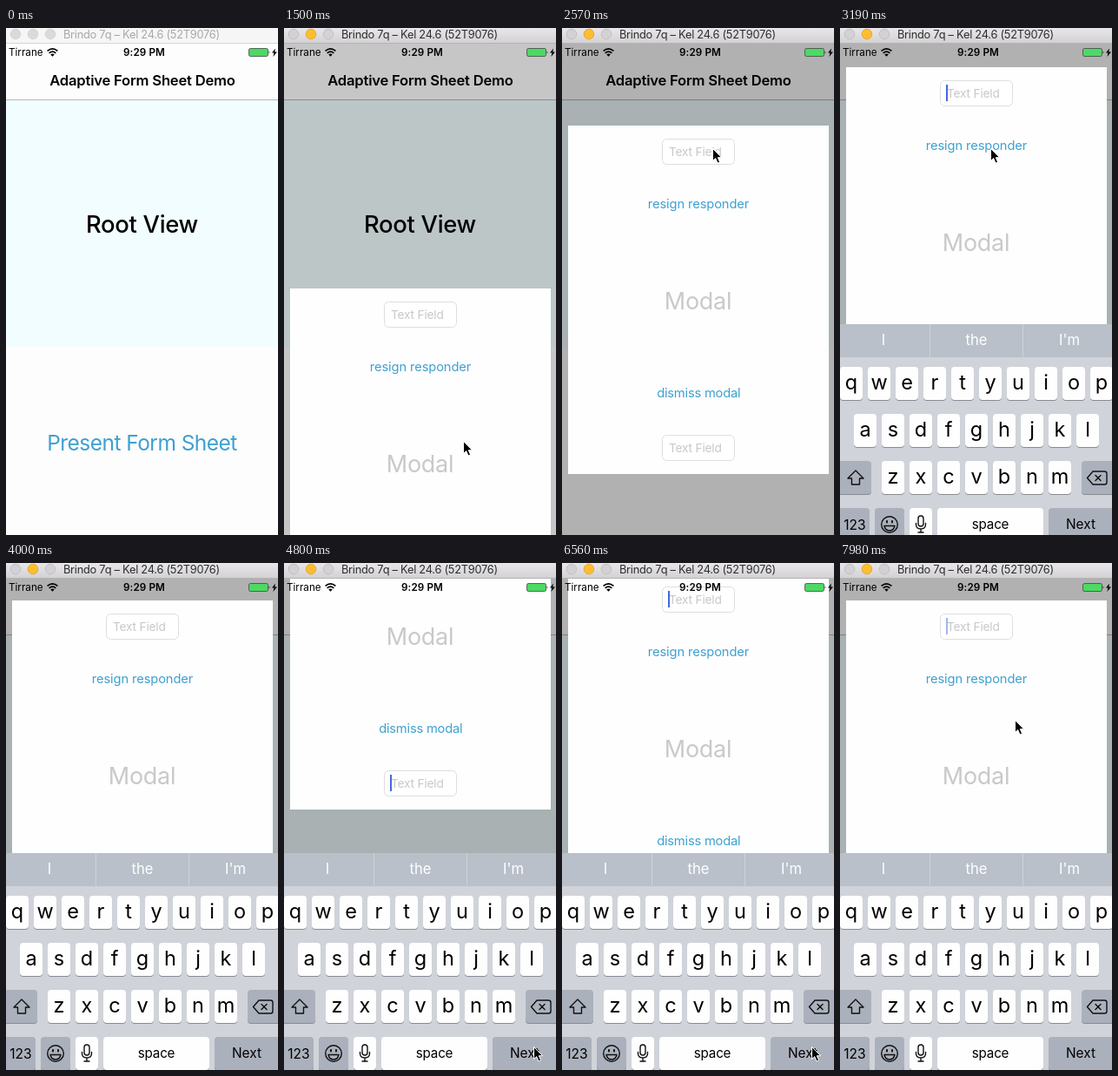
Recreate the animation shown at these times as an HTML page. Size 313 by 582 pixels, loop 8000 ms.

```html
<!DOCTYPE html>
<html lang="en">
<head>
<meta charset="utf-8">
<title>Adaptive Form Sheet Demo</title>
<style>
  html, body { margin: 0; width: 100%; height: 100%; overflow: hidden; background: #fdfdfd; }
  svg { display: block; width: 313px; height: 582px; font-family: Inter, "Open Sans", sans-serif; }
  text { white-space: pre; }
  .mid { text-anchor: middle; }
  .link { fill: #3ea0d0; }
  .hint { fill: #c8c8cb; }
  .icon { fill: none; stroke: #111; stroke-width: 1.4; stroke-linecap: round; stroke-linejoin: round; }
</style>
</head>
<body>
<svg id="stage" viewBox="0 0 313 582">
  <defs>
    <linearGradient id="chrome" x2="0" y2="1">
      <stop stop-color="#e9e7e9"/><stop offset="1" stop-color="#d2d0d2"/>
    </linearGradient>
  </defs>

  <g id="root">
    <rect width="313" height="582" fill="#fdfdfd"/>
    <rect y="82" width="313" height="1" fill="#b3b6b8"/>
    <rect y="83" width="313" height="283" fill="#f2fdff"/>
  </g>
  <rect id="dim" y="18" width="313" height="564"/>
  <g id="labels"></g>
  <g id="modal"></g>
  <g id="keyboard"></g>

  <g id="status">
    <g fill="none" stroke="#000" stroke-width="1.7">
      <path d="M47.6 26.4Q53.5 21.2 59.4 26.4M49.7 28.8Q53.5 25.5 57.3 28.8"/>
      <path d="M51.3 30.4Q53.5 28.7 55.7 30.4L53.5 32.7Z" fill="#000" stroke="none"/>
    </g>
    <rect x="279.5" y="23.5" width="22" height="9" rx="1.8" fill="#4cd964" stroke="#444" stroke-width=".8"/>
    <path d="M302.7 26.5q1.6 1.5 0 3z"/>
    <path d="M310 23.5l-4 5h2.5l-1.2 4.5 4.7-5.5h-2.7z"/>
  </g>

  <g id="window">
    <rect id="bar" width="313" height="18"/>
    <rect id="barEdge" y="17" width="313" height="1"/>
    <g id="lights" stroke-width=".8"></g>
  </g>

  <path id="cursor" d="M.5 .5V14.5L3.7 11.6L6 17L8.6 15.9L6.3 10.7H10.6Z"
        stroke="#fff" stroke-linejoin="round"/>
</svg>

<script>
const LOOP = 8000;
const $ = id => document.getElementById(id);
const add = (id, markup) => $(id).insertAdjacentHTML('beforeend', markup);

const label = (str, x, y, size, { cls = 'mid', gap = 0, weight = 400, fill = '' } = {}) =>
  `<text class="${cls}" x="${x}" y="${y}" font-size="${size}" font-weight="${weight}"
    letter-spacing="${gap}"${fill && ` fill="${fill}"`}>${str}</text>`;

// ---- static pieces ----
add('labels',
  label('Adaptive Form Sheet Demo', 157, 66, 16.6, { gap: -.2, weight: 600 }) +
  label('Root View', 156.5, 234.5, 27.4, { gap: -.3, weight: 500 }));
add('root', label('Present Form Sheet', 156.5, 485, 24.5, { cls: 'mid link', gap: -.54 }));

const field = y =>
  `<rect x="115.5" y="${y + .5}" width="83" height="29" rx="5" fill="#fff" stroke="#dedede"/>` +
  label('Text Field', 123, y + 20, 13.7, { cls: 'hint', gap: -.2 });

add('modal',
  '<rect x="7" width="300" height="400" fill="#fefefe"/>' + field(15) + field(355) +
  label('resign responder', 157, 95, 14.7, { cls: 'mid link', gap: -.11 }) +
  label('Modal', 156.5, 210.5, 27, { gap: -.3, fill: '#c9c9c9' }) +
  label('dismiss modal', 157.3, 311.5, 14.7, { cls: 'mid link', gap: -.2 }) +
  '<rect id="caret" x="122" width="2" height="19" fill="#4368dc"/>');

const GREY = '#abb1bc', WHITE = '#fefefe';
const ROW = 54, PITCH = 32, KEY = 26;
const key = (x, row, w, fill = WHITE, id = '') => {
  const y = 49 + ROW * row;
  return `<rect x="${x}" y="${y + 1}" width="${w}" height="38" rx="4" fill="#888b90"/>
    <rect ${id && `id="${id}"`} x="${x}" y="${y}" width="${w}" height="38" rx="4" fill="${fill}"/>`;
};

function keyboardMarkup() {
  let out = `<rect width="313" height="252" fill="#d0d3d9"/>
    <rect width="313" height="38" fill="#b9c0c9"/>
    <path d="M103.5 0V38M210.5 0V38" stroke="#cdd2d8"/>`;
  ['I', 'the', "I'm"].forEach((word, i) =>
    out += label(word, 50 + 107 * i, 24, 16.6, { fill: '#fff' }));
  ['qwertyuiop', 'asdfghjkl', 'zxcvbnm'].forEach((letters, row) => {
    const left = (10 - letters.length) * PITCH / 2;
    [...letters].forEach((ch, i) => {
      const x = left + PITCH * i;
      out += key(x, row, KEY) + label(ch, x + KEY / 2, 75 + ROW * row, 23.5);
    });
  });
  out += key(-2, 2, 38, GREY) + key(278, 2, 38, GREY) +
    key(-2, 3, 36, GREY) + key(40, 3, 34, GREY) + key(80, 3, KEY) +
    key(112, 3, 122) + key(240, 3, 76, GREY, 'next') +
    label('123', 17, 236, 15.6) + label('space', 173, 235, 15.2, { gap: -.2 }) +
    label('Next', 277, 235, 15.4);
  // shift, delete, smiley, microphone
  return out + `<g class="icon">
    <path d="M18 168L27 177H22.5V184H13.5V177H9Z"/>
    <path d="M291 169H304.5Q307 169 307 171.5V181.5Q307 184 304.5 184H291L284.5 176.5ZM294 173.5l6 6m0-6l-6 6"/>
    <circle cx="57" cy="230" r="9.3"/>
    <path d="M51 231.5H63Q62 237 57 237T51 231.5Z"/>
    <path d="M54 226v1.5M60 226v1.5" stroke-width="2"/>
    <rect x="90" y="220" width="6" height="12" rx="3"/>
    <path d="M87.5 228.5v1.5q0 5 5.5 5t5.5-5v-1.5M93 235v4M90 239h6"/></g>`;
}
add('keyboard', keyboardMarkup());

add('status',
  label('Tirrane', 3, 32, 11.7, { cls: '' }) +
  label('9:29 PM', 159, 32, 11.7, { weight: 600, gap: .1 }));
add('window', `<g id="title">${label('Brindo 7q – Kel 24.6 (52T9076)', 66, 12, 12.8, { cls: '', gap: -.25 })}</g>`);
add('lights', [11, 31, 51].map(x => `<circle cx="${x}" cy="7" r="5.8"/>`).join(''));

// ---- timing ----
// The screen refreshes at a steady beat rather than continuously.
const BEAT = 88.6, PHASE = 82.4;
const snap = t => Math.max(0, PHASE + BEAT * Math.floor((t - PHASE) / BEAT));

// Window click, sheet opens, first field focused, on to the second field, back to the first.
const ACTIVATE = 1230, OPEN = 1398.5, FOCUS = 2915, DOWN = 4583, UP = 6392;

const clamp = v => Math.min(1, Math.max(0, v));
const easeOut = k => 1 - (1 - k) ** 3;

// Critically damped spring from 0 to 1.
const spring = (t, start) => {
  const x = Math.max(0, t - start) * .02;
  return 1 - (1 + x) * Math.exp(-x);
};

// Each glide leads from wherever the pointer rests to a new place.
const glides = [
  { from: 560, to: 870, x: 206, y: 474 },
  { from: 1990, to: 2560, x: 173, y: 138 },
  { from: 3820, to: 4070, x: 330, y: 540 },
  { from: 4190, to: 4420, x: 287, y: 555 },
  { from: 7620, to: 7960, x: 201, y: 180 }
];
const cursorAt = t => glides.reduce((p, g) => {
  const k = easeOut(clamp((t - g.from) / (g.to - g.from)));
  return { x: p.x + (g.x - p.x) * k, y: p.y + (g.y - p.y) * k };
}, { x: 330, y: 486 });

// Solid after each change of focus, then a soft 900 ms blink.
function caretOpacity(t) {
  const age = t - [UP, DOWN, FOCUS].find(start => t >= start);
  if (isNaN(age)) return 0;
  return age < 450 ? 1 : clamp(.5 - 2 * Math.cos(2 * Math.PI * age / 900));
}

const set = (id, attrs) => {
  for (const name in attrs) $(id).setAttribute(name, attrs[name]);
};
const move = (id, x, y) =>
  set(id, { transform: `translate(${Math.round(x)} ${Math.round(y)})` });

function draw(time) {
  const t = snap(time);
  const open = spring(t, OPEN), focus = spring(t, FOCUS);
  const shift = spring(t, DOWN) - spring(t, UP);

  move('modal', 0, 582 - 470 * open - 69 * focus - 178 * shift);
  move('keyboard', 0, 582 - 249 * focus);
  set('dim', { opacity: .3 * open ** .6 });
  set('caret', { y: t >= DOWN && t < UP ? 360 : 20, opacity: caretOpacity(t) });

  const pressed = [DOWN, UP].some(release => t >= release - 170 && t < release);
  set('next', { fill: pressed ? WHITE : GREY });

  const active = t >= ACTIVATE;
  set('bar', { fill: active ? 'url(#chrome)' : '#f6f6f6' });
  set('barEdge', { fill: active ? '#b5b3b5' : '#d6d6d6' });
  set('title', { fill: active ? '#2e2e2e' : '#a8a8a8' });
  [...$('lights').children].forEach((dot, i) => {
    const lit = active && i === 1;
    dot.setAttribute('fill', lit ? '#fdbd2f' : active ? '#d3d1d3' : '#dadada');
    dot.setAttribute('stroke', lit ? '#e0a028' : active ? '#bcbabc' : '#d0d0d0');
  });

  const { x, y } = cursorAt(t);
  move('cursor', x, y);
}

const begin = performance.now();
function frame() {
  draw((performance.now() - begin) % LOOP);
  requestAnimationFrame(frame);
}
frame();
</script>
</body>
</html>
```
